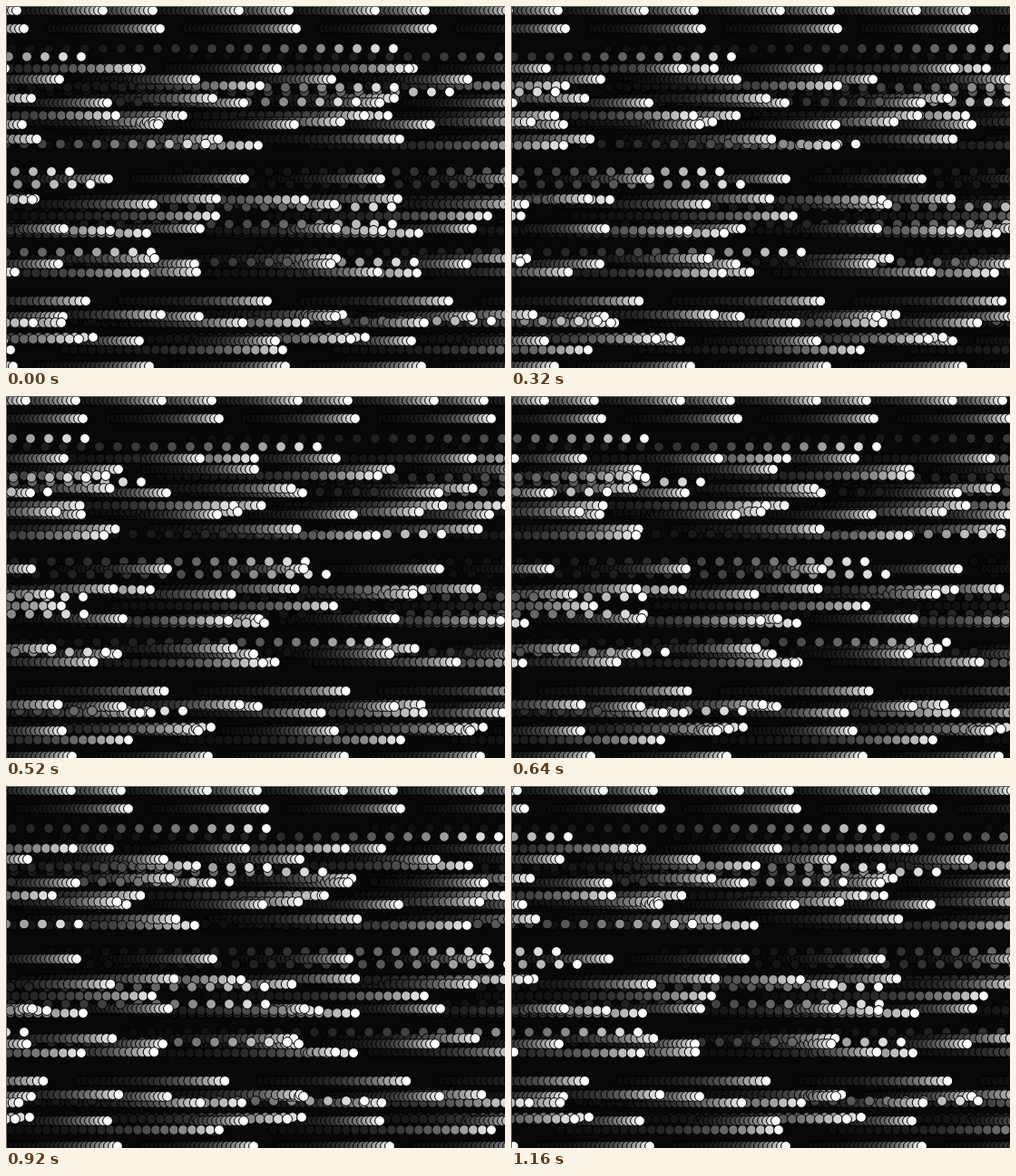
An HTML page with a canvas that plays this animation: 550x400 px, repeating every 1200 ms.

```html
<!DOCTYPE html>
<html lang="en">
<head>
<meta charset="utf-8">
<title>Running dots</title>
<style>
  html, body { margin: 0; width: 100%; height: 100%; overflow: hidden; background: #080808; }
  canvas { display: block; }
</style>
</head>
<body>
<canvas id="stage" width="550" height="400"></canvas>
<script>
const ctx = document.getElementById('stage').getContext('2d');
const STEPS = 30, STEP_MS = 40, FADE = 0.85, FLOOR = 8;

// Dot spacing -> flat list of y, start x. Every row advances one spacing per loop.
const rows = {
  150: [5, 12, 5, 107, 25, 20, 69, 149, 81, 59, 107, 112, 131, 18, 191, 113,
        246, 64, 285, 58, 343, 63, 370, 147, 398, 8],
  200: [102, 28, 121, 195, 128, 169, 147, 34, 213, 32, 219, 162, 279, 164,
        294, 10, 326, 88, 341, 171, 350, 61],
  300: [69, 144, 88, 280, 121, 121, 154, 278, 214, 29, 232, 231, 248, 115,
        251, 155, 295, 153, 350, 30, 366, 96, 368, 80, 380, 5],
  600: [47, 427, 56, 83, 90, 428, 95, 489, 106, 386, 152.5, 220, 183, 70,
        197, 93, 222, 425, 241, 426, 272, 160, 283, 450, 348, 535]
};

const lanes = [];
for (const [key, list] of Object.entries(rows))
  for (let i = 0; i < list.length; i += 2)
    lanes.push({ gap: +key, y: list[i], x: list[i + 1] });
lanes.sort((a, b) => a.y - b.y);

function dot(x, y) {
  ctx.beginPath();
  ctx.arc(x, y, 5.4, 0, 2 * Math.PI);
  ctx.fill();
  ctx.stroke();
}

function draw(step) {
  ctx.fillStyle = `rgb(${FLOOR},${FLOOR},${FLOOR})`;
  ctx.fillRect(0, 0, 550, 400);
  ctx.strokeStyle = '#000';
  ctx.lineWidth = 1;
  // Oldest trail dots first, bright heads last
  for (let age = 24; age >= 0; age--) {
    const c = Math.round(FLOOR + (255 - FLOOR) * FADE ** age);
    ctx.fillStyle = `rgb(${c},${c},${c})`;
    for (const { gap, x, y } of lanes) {
      const pos = x + (step - age) * gap / STEPS;
      const first = ((pos % gap) + gap) % gap - gap;
      for (let px = first; px < 560; px += gap)
        if (px > -10) dot(px, y);
    }
  }
  ctx.fillStyle = '#666';
  ctx.fillRect(0, 0, 550, 1);
  ctx.fillRect(0, 0, 1, 400);
}

let start, shown = -1;
function tick(now) {
  start ??= now;
  const step = Math.floor((now - start) / STEP_MS) % STEPS;
  if (step !== shown) draw(shown = step);
  requestAnimationFrame(tick);
}
draw(0);
requestAnimationFrame(tick);
</script>
</body>
</html>
```
